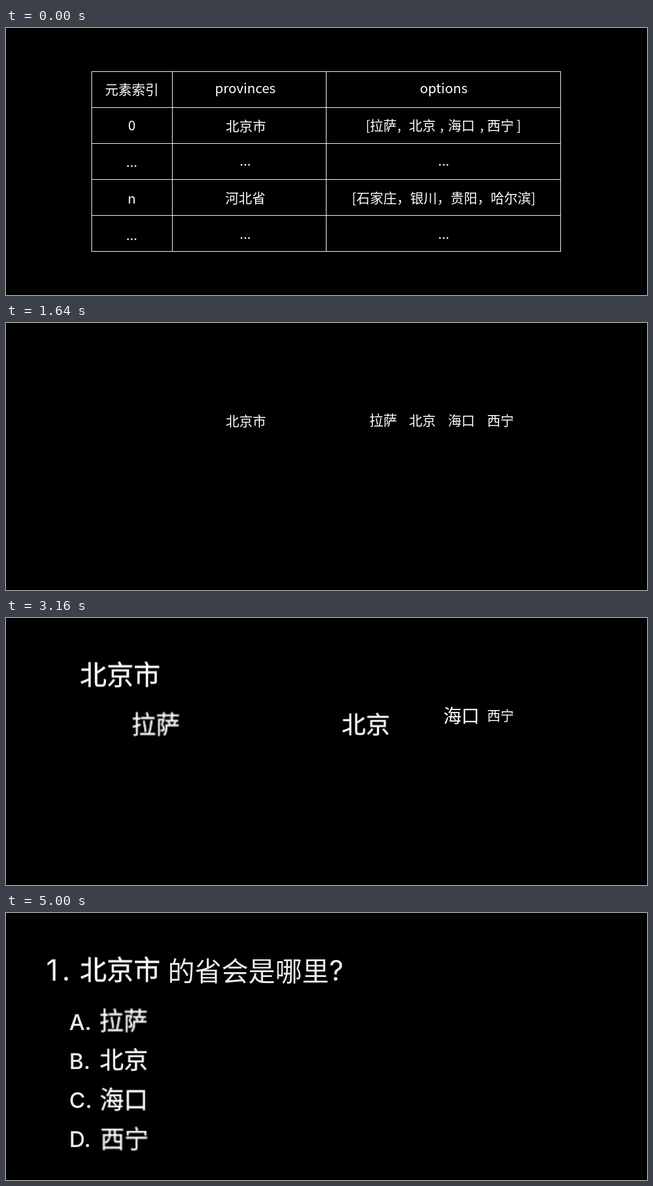
Write an HTML page that moves like this. It is 1050 by 438 pixels and loops after 6000 ms.

```html
<!DOCTYPE html>
<html lang="zh-CN">
<head>
<meta charset="utf-8">
<title>Quiz data mapping</title>
<style>
  html, body { margin: 0; width: 100%; height: 100%; overflow: hidden; background: #000; }
  #stage {
    position: relative; width: 1050px; height: 438px; overflow: hidden; background: #000;
    color: #fff; font: 22px "Noto Sans CJK SC", "Noto Sans CJK", "Noto Sans", sans-serif;
  }
  svg { position: absolute; left: 0; top: 0; }
  text { white-space: pre; }
  .mid { text-anchor: middle; }
  .latin { font-family: Inter, Roboto, sans-serif; }
  .word {
    position: absolute; top: -16px; height: 32px; line-height: 28px;
    white-space: nowrap; will-change: transform;
  }
</style>
</head>
<body>
<div id="stage">
  <svg width="1050" height="438" fill="#fff">
    <g id="table"></g>
    <g id="quiz" fill-opacity="0"></g>
  </svg>
</div>
<script>
const LOOP = 6000, STEP = 40, END = 5000;
const SVG = 'http://www.w3.org/2000/svg';
const stage = document.getElementById('stage');
const table = document.getElementById('table');
const quiz = document.getElementById('quiz');

function add(parent, tag, attrs, text = '') {
  const el = document.createElementNS(SVG, tag);
  for (const key in attrs) el.setAttribute(key, attrs[key]);
  el.textContent = text;
  parent.append(el);
}
const rule = (x, y, width, height) =>
  add(table, 'rect', { x, y, width, height, 'shape-rendering': 'crispEdges' });
const cell = (text, x, y) => add(table, 'text', { x, y, class: 'mid' }, text);
const latin = (text, x, y, size, weight = 400, cls = 'latin mid') =>
  add(quiz, 'text', { x, y, class: cls, 'font-size': size, 'font-weight': weight }, text);

// Borders shared by two rows are laid twice, so they fade later.
for (const x of [140, 272, 524, 908]) rule(x, 71, 1, 296);
for (const y of [71, 130, 189, 248, 307, 366]) {
  rule(140, y, 769, 1);
  const outer = y === 71 || y === 366;
  rule(outer ? 272 : 140, y, outer ? 253 : 769, 1);
}

cell('元素索引', 206, 109);
cell('provinces', 392, 107);
cell('options', 717, 107);
cell('0', 206, 168);
cell('[', 593, 168);
for (const x of [644, 714, 779.5]) cell(',', x, 168);
cell(']', 840, 168);
cell('n', 206, 288);
cell('河北省', 392, 287);
cell('[石家庄，银川，贵阳，哈尔滨]', 717, 287);
for (const y of [226, 346]) {
  cell('...', 206, y + 2);
  cell('...', 392, y);
  cell('...', 717, y);
}

latin('1', 75.5, 111, 48);
latin('.', 98.5, 111, 48);
add(quiz, 'text', { x: 265, y: 112, 'font-size': 44 }, '的省会是哪里');
latin('?', 541, 111, 46);
[...'ABCD'].forEach((c, i) => latin(c + '.', 103.5, 191.5 + 64 * i, 36, 500, 'latin'));

// text, from, to, final scale, grow [start, end], move [start, end]
const words = [
  ['北京市', [393, 161], [187, 93], 2, [1640, 2000], [2008, 2679]],
  ['拉萨', [618, 160], [192.5, 177], 1.8, [1625, 1985], [2400, 3268]],
  ['北京', [682, 160], [193, 241.5], 1.8, [2340, 2700], [2880, 4359]],
  ['海口', [746, 160], [193, 305.5], 1.8, [3005, 3365], [3521, 4440]],
  ['西宁', [810, 160], [194, 370], 1.8, [3577, 3937], [4035, 4765]],
].map(([text, from, to, size, grow, move]) => {
  const el = document.createElement('div');
  el.className = 'word';
  el.textContent = text;
  el.style.left = -11 * text.length + 'px';
  stage.append(el);
  return { el, from, to, size, grow, move };
});

const ramp = (t, [a, b]) => Math.min(1, Math.max(0, (t - a) / (b - a)));
const mix = (a, b, p) => a + (b - a) * p;

function render(t) {
  table.setAttribute('fill-opacity', 1 - ramp(t, [590, 1100]));
  quiz.setAttribute('fill-opacity', 0.92 * ramp(t, [3595, END]));
  for (const w of words) {
    const p = ramp(t, w.move), grown = ramp(t, w.grow);
    const x = mix(w.from[0], w.to[0], p), y = mix(w.from[1], w.to[1], p);
    w.el.style.transform = `translate(${x}px, ${y}px) scale(${mix(1, w.size, grown)})`;
    // Enlarged words get a slightly heavier stroke.
    w.el.style.webkitTextStroke = `${0.25 * grown}px #fff`;
  }
}

const start = performance.now();
function tick() {
  const t = (performance.now() - start) % LOOP;
  render(Math.min(END, Math.floor(t / STEP) * STEP));
  requestAnimationFrame(tick);
}
tick();
</script>
</body>
</html>
```
